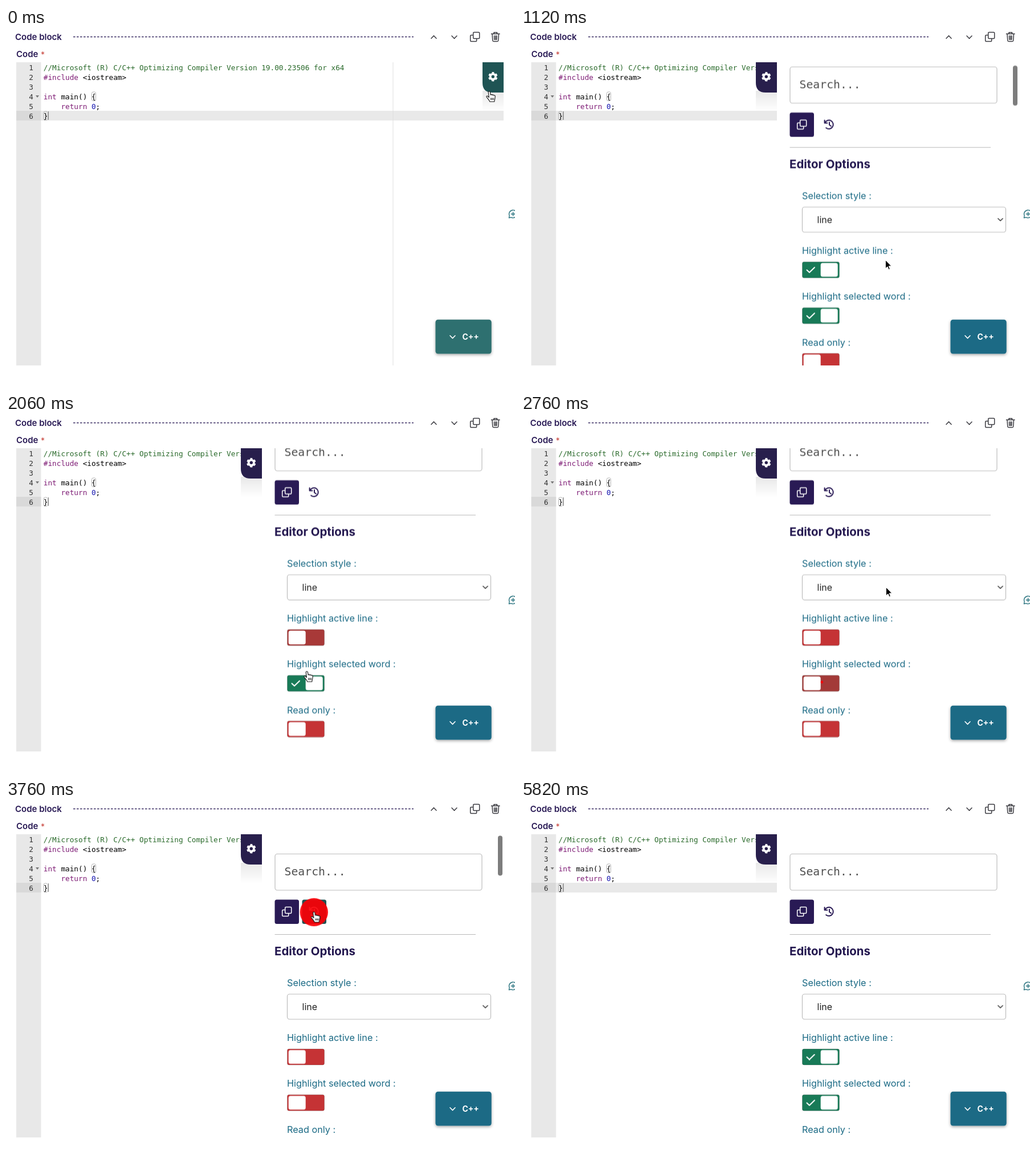
Recreate the animation shown at these times as an HTML page. Size 893 by 627 pixels, loop 6.94 s.

```html
<!DOCTYPE html>
<html lang="en">
<head>
<meta charset="utf-8">
<title>Code block settings</title>
<style>
  :root { --loop: 6.94s; --navy: #291a55; --teal: #1b6a85; --green: #187a57; --red: #c53335; --dark: #a33a38; }
  html, body { margin: 0; width: 100%; height: 100%; overflow: hidden; background: #fff; }
  svg { display: block; width: 893px; height: 627px; }
  text { font-family: Inter, "Open Sans", sans-serif; font-size: 16px; white-space: pre; }
  .mono text { font-family: "DejaVu Sans Mono", "Noto Sans Mono", monospace; font-size: 12.71px; }
  .mono .search { font-size: 19.8px; }
  .key { fill: #7d1a74; }
  .title { font-size: 15px; font-weight: 600; fill: var(--navy); }
  .line { fill: none; stroke-linecap: round; stroke-linejoin: round; }
  .label { font-size: 16.25px; fill: var(--teal); }

  /* hard changes */
  .panel, .gear, .lang, .active, .note, .hover, .histicon, .hand, .arrow { animation: var(--loop) step-end infinite; }
  .panel { animation-name: open; }
  .gear { animation-name: gear; }
  .lang { animation-name: lang; }
  .active { animation-name: active; }
  .note { animation-name: note; }
  .hover { animation-name: hover; }
  .histicon { animation-name: histicon; }
  .hand { animation-name: hand; }
  .arrow { animation-name: arrow; }
  @keyframes open { 0% { opacity: 0 } 5.9%, 100% { opacity: 1 } }
  @keyframes gear {
    0% { transform: translate(836px, 60px); fill: #1f5454 }
    5.9%, 100% { transform: translate(412px, 60px); fill: #281f4c }
  }
  @keyframes lang { 0% { fill: #2e706f } 5.9%, 100% { fill: var(--teal) } }
  @keyframes active { 0% { opacity: 1 } 25% { opacity: 0 } 56%, 100% { opacity: 1 } }
  @keyframes note { 0% { opacity: 0 } 55.5% { opacity: 1 } 73.5%, 100% { opacity: 0 } }
  @keyframes hover { 0% { opacity: 0 } 50.1% { opacity: 1 } 62.2%, 100% { opacity: 0 } }
  @keyframes histicon { 0% { stroke: #291a55 } 50.1% { stroke: #fff } 62.2%, 100% { stroke: #291a55 } }
  @keyframes hand {
    0% { opacity: 1 } 5.9% { opacity: 0 } 23% { opacity: 1 }
    36.7% { opacity: 0 } 50.1% { opacity: 1 } 62.2%, 100% { opacity: 0 }
  }
  @keyframes arrow {
    0% { opacity: 0 } 5.9% { opacity: 1 } 23% { opacity: 0 } 36.7% { opacity: 1 }
    50.1% { opacity: 0 } 62.2% { opacity: 1 } 83.8%, 100% { opacity: 0 }
  }

  /* smooth motion */
  .pointer { animation: move var(--loop) ease-in-out infinite; }
  @keyframes move {
    0% { transform: translate(848px, 111px) }
    2.6%, 10.4% { transform: translate(847px, 103px) }
    15.3%, 19.2% { transform: translate(639px, 406px) }
    23.3%, 28.1% { transform: translate(528px, 391px) }
    30.5%, 36.3% { transform: translate(528px, 469px) }
    38.9%, 45.4% { transform: translate(640px, 303px) }
    50.8%, 61.4% { transform: translate(540.5px, 196px) }
    65.1% { transform: translate(544.5px, 479px) }
    72% { transform: translate(545px, 482px) }
    76.4%, 82.9% { transform: translate(474px, 498px) }
    82.95%, 100% { transform: translate(451px, 545px) }
  }
  .scroll { animation: scroll var(--loop) ease-out infinite; }
  @keyframes scroll {
    0%, 15.3% { transform: translateY(0) }
    18.1%, 41.8% { transform: translateY(-58.5px) }
    45.4%, 100% { transform: translateY(0) }
  }
  .thumb { animation: thumb var(--loop) ease-out infinite, bar var(--loop) linear infinite; }
  @keyframes thumb {
    0%, 15.3% { transform: translateY(0) }
    18.1%, 41.8% { transform: translateY(7.5px) }
    45.4%, 100% { transform: translateY(0) }
  }
  @keyframes bar {
    0%, 15.2% { opacity: 0 } 15.3%, 26% { opacity: 1 } 28.8%, 41.7% { opacity: 0 }
    41.8%, 56.2% { opacity: 1 } 59%, 100% { opacity: 0 }
  }
  .pulse { fill: #fb0007; fill-opacity: .92; transform: scale(0); animation: pulse var(--loop) linear infinite; }
  @keyframes pulse { 0% { transform: scale(1) } 5.9%, 100% { transform: scale(0) } }

  .track { fill: var(--green); stroke: #000; stroke-opacity: .2; }
  .tick { stroke: #fff; stroke-width: 2; }
  .knob { fill: #fff; }
  .off .track { fill: var(--red); }
  .off .knob { transform: translateX(-30px); }
  .off .tick { opacity: 0; }
  .first .track { animation: track1 var(--loop) infinite; }
  .first .knob { animation: knob1 var(--loop) infinite; }
  .first .tick { animation: tick1 var(--loop) infinite; }
  .second .track { animation: track2 var(--loop) infinite; }
  .second .knob { animation: knob2 var(--loop) infinite; }
  .second .tick { animation: tick2 var(--loop) infinite; }
  @keyframes track1 {
    0%, 24.8% { fill: var(--green) } 26.5%, 29.5% { fill: var(--dark) }
    31%, 55.5% { fill: var(--red) } 58%, 100% { fill: var(--green) }
  }
  @keyframes track2 {
    0%, 35.3% { fill: var(--green) } 37%, 40.3% { fill: var(--dark) }
    41.5%, 55.5% { fill: var(--red) } 58%, 100% { fill: var(--green) }
  }
  @keyframes knob1 { 0%, 24.8% { transform: none } 26.5%, 55.5% { transform: translateX(-30px) } 58%, 100% { transform: none } }
  @keyframes knob2 { 0%, 35.3% { transform: none } 37%, 55.5% { transform: translateX(-30px) } 58%, 100% { transform: none } }
  @keyframes tick1 { 0%, 24.8% { opacity: 1 } 25.5%, 56.5% { opacity: 0 } 58%, 100% { opacity: 1 } }
  @keyframes tick2 { 0%, 35.3% { opacity: 1 } 36%, 56.5% { opacity: 0 } 58%, 100% { opacity: 1 } }
</style>
</head>
<body>
<svg viewBox="0 0 893 627">
  <defs>
    <linearGradient id="fade" x1="0" y1="0" x2="0" y2="1">
      <stop offset="0" stop-opacity=".09"/><stop offset="1" stop-opacity="0"/>
    </linearGradient>
    <filter id="drop" x="-20%" y="-20%" width="140%" height="150%">
      <feDropShadow dx="0" dy="2" stdDeviation="2.5" flood-opacity=".35"/>
    </filter>
    <clipPath id="view"><rect x="449" y="60" width="424" height="531"/></clipPath>
    <path id="down" d="M-4.5-2.2 0 2.4 4.5-2.2"/>
    <path id="copy" d="M-1.5-8H6.5Q8-8 8-6.5V1.5Q8 3 6.5 3H-1.5Q-3 3-3 1.5V-6.5Q-3-8-1.5-8ZM-3-3H-6.5Q-8-3-8-1.5V6.5Q-8 8-6.5 8H1.5Q3 8 3 6.5V3"/>
  </defs>

  <!-- header -->
  <text class="title" x="16" y="20.5">Code block</text>
  <path d="M118 15.5H715" stroke="#3b2d63" stroke-width="1.4" stroke-dasharray="3.6 2.4"/>
  <g class="line" stroke="#3a3a40" stroke-width="1.5">
    <use href="#down" transform="translate(750.5 16) scale(1 -1)"/>
    <use href="#down" x="786.5" y="16"/>
    <use href="#copy" x="822.7" y="15.5"/>
    <path d="M851.5 10.2H866M856 10V7.8H861.5V10M853 10.5 853.8 22Q854 23.5 855.5 23.5H862Q863.5 23.5 863.7 22L864.5 10.5M856.5 13.5 856.8 20.5M858.8 13.5V20.5M861 13.5 860.7 20.5"/>
  </g>
  <text class="title" x="18" y="50.5">Code</text>
  <text x="61" y="52" style="font-size:14px" fill="#c8443c">*</text>

  <!-- editor -->
  <rect x="18" y="60" width="43.5" height="531" fill="#e8e8e8"/>
  <rect x="18" y="145" width="43.5" height="17" fill="#d9d9d9"/>
  <rect class="active" x="61.5" y="145" width="811.5" height="17" fill="#e9e9e9"/>
  <path d="M679 60V591" stroke="#dedede"/>
  <path d="M52 118H58L55 122Z" fill="#777"/>
  <g fill="none" stroke="#b5b5b5">
    <rect x="150.5" y="112" width="7" height="15.5" rx="2.5"/>
    <rect x="66" y="146" width="7" height="15.5" rx="2.5"/>
  </g>
  <path d="M74.5 146V161" stroke="#777"/>
  <g class="mono">
    <g text-anchor="end" fill="#333">
      <text x="48" y="73.5">1</text><text x="48" y="90.5">2</text><text x="48" y="107.5">3</text>
      <text x="48" y="124.5">4</text><text x="48" y="141.5">5</text><text x="48" y="158.5">6</text>
    </g>
    <text x="65.8" y="73.5" fill="#2a6a2b">//Microsoft (R) C/C++ Optimizing Compiler Version 19.00.23506 for x64</text>
    <text x="65.8" y="90.5"><tspan class="key">#include</tspan> &lt;iostream&gt;</text>
    <text x="65.8" y="124.5"><tspan class="key">int</tspan> main() {</text>
    <text x="96.4" y="141.5"><tspan class="key">return</tspan> <tspan fill="#1515b0">0</tspan>;</text>
    <text x="65.8" y="158.5">}</text>
  </g>

  <!-- options -->
  <g class="panel" clip-path="url(#view)">
    <rect x="449" y="60" width="424" height="531" fill="#fff"/>
    <g class="scroll">
      <rect x="472" y="94.5" width="363" height="63.5" rx="4" fill="#fff" stroke="#bcbcbc" stroke-width="1.2"/>
      <g class="mono"><text class="search" x="488.5" y="132.3" fill="#505050">Search...</text></g>
      <rect x="471.5" y="174.5" width="42.5" height="42.5" rx="3.5" fill="#291a55"/>
      <use class="line" href="#copy" x="492.7" y="195.5" stroke="#fff" stroke-width="1.5"/>
      <rect class="hover" x="519.5" y="174.5" width="42.5" height="42.5" rx="3.5" fill="#1f5454"/>
      <path class="histicon line" d="M533.3 192.2A7.6 7.6 0 1 1 535.2 201.2M532.6 188V192.8H537.4M541 191.6V196L544 198.2" stroke-width="2"/>
      <text class="note" x="567" y="201" style="font-size:14.1px" fill="#291a55">Changes reset</text>
      <path d="M471.5 235.5H824" stroke="#b9b9b9"/>
      <text x="471" y="272.4" style="font-size:20.4px;font-weight:700" fill="#23174f">Editor Options</text>
      <text class="label" x="493" y="326.3">Selection style :</text>
      <rect x="493.5" y="340" width="357" height="44" rx="4" fill="#fff" stroke="#bcbcbc" stroke-width="1.2"/>
      <text x="519.5" y="368" fill="#222">line</text>
      <use class="line" href="#down" transform="translate(841 362) scale(.9)" stroke="#333" stroke-width="1.6"/>
      <text class="label" x="493" y="422.3">Highlight active line :</text>
      <g class="switch first" transform="translate(493 435.5)"></g>
      <text class="label" x="493" y="502.3">Highlight selected word :</text>
      <g class="switch second" transform="translate(493 515.7)"></g>
      <text class="label" x="493" y="582.6">Read only :</text>
      <g class="switch off" transform="translate(493 595.7)"></g>
    </g>
    <rect class="thumb" x="863" y="62.5" width="8" height="70" rx="4" fill="#7d7d7d"/>
  </g>

  <g class="gear">
    <rect y="50" width="37" height="36" fill="url(#fade)"/>
    <path d="M0 0H37V53H17Q0 53 0 36Z"/>
    <g transform="translate(18.3 25.3) rotate(-90)" fill="none" stroke="#fff">
      <circle r="4.6" stroke-width="3.8"/>
      <circle r="6.7" stroke-width="3" stroke-dasharray="3.9 3.116" stroke-dashoffset="1.95"/>
    </g>
  </g>

  <g filter="url(#drop)"><rect class="lang" x="753.5" y="510.7" width="98.2" height="59.8" rx="4.5"/></g>
  <use class="line" href="#down" x="783.5" y="541" stroke="#fff" stroke-width="1.6"/>
  <text x="800.5" y="546" style="font-size:14px;font-weight:700" fill="#fff">C++</text>

  <path class="line" d="M883.2 328.5A6.8 6.8 0 1 1 886 331.6L882.5 332.6ZM886.3 325.7H893M889.6 322.4V329" stroke="#25707c" stroke-width="1.4"/>

  <!-- clicks and pointer -->
  <g transform="translate(847 104)"><circle class="pulse" r="26" style="animation-delay:330ms"/></g>
  <g transform="translate(528 391)"><circle class="pulse" r="26" style="animation-delay:1650ms"/></g>
  <g transform="translate(528 469.5)"><circle class="pulse" r="26" style="animation-delay:2390ms"/></g>
  <g transform="translate(540.3 196.5)"><circle class="pulse" r="26" style="animation-delay:3740ms"/></g>
  <g class="pointer" stroke-linejoin="round">
    <path class="arrow" d="M.4 .4V15.2L3.9 12 6.1 17.2 8.4 16.2 6.2 11H10.8Z" stroke="#fff" stroke-width="1"/>
    <path class="hand" d="M-1.8 1.5C-1.8-.5 1.2-.5 1.4 1.3L2.2 6.2C2.8 5 4.8 5.2 5 6.6C5.8 5.4 7.5 5.8 7.7 7.2C8.6 6.3 10.2 7 10.2 8.6C10.3 12.5 9 14 8.8 18H.8C0 15.5-2.6 13-4.8 10C-5.8 8.4-3.8 7.4-2.6 8.6L-.6 10.6ZM2.8 11.5V15M5 11.5V15M7.2 11.5V15" fill="#fff" stroke="#111" stroke-width="1.1"/>
  </g>
</svg>
<script>
  const parts = `
    <rect class="track" x=".5" y=".5" width="65" height="28" rx="3"/>
    <path class="tick line" d="M8.5 14.8 13 19 22 10.2"/>
    <rect class="knob" x="32.7" y="2.5" width="30" height="24" rx="3.5"/>`;
  document.querySelectorAll('.switch').forEach(g => { g.innerHTML = parts; });
</script>
</body>
</html>
```
